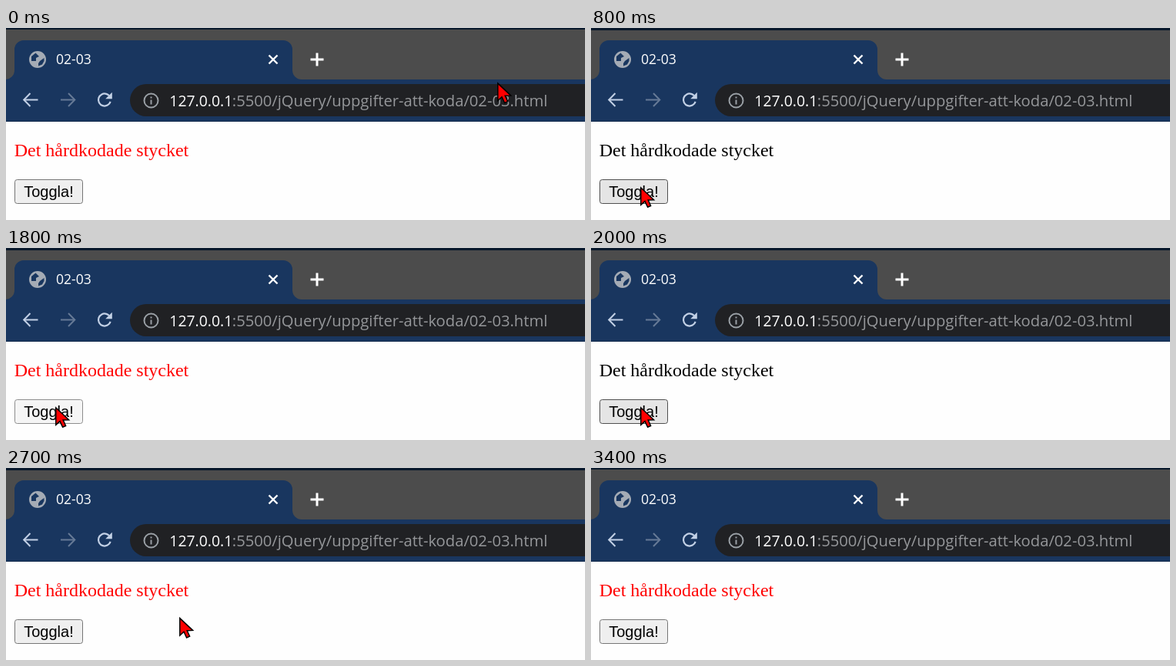
These frames come from a looping animation (752 by 250 pixels, 3500 ms). An HTML page with a canvas:

```html
<!DOCTYPE html>
<html lang="sv">
<head>
<meta charset="utf-8">
<title>02-03</title>
<style>
html, body { margin: 0; width: 100%; height: 100%; overflow: hidden; background: #fefefe; }
canvas { display: block; width: 752px; height: 250px; }
</style>
</head>
<body>
<canvas id="stage"></canvas>
<script>
const W = 752, H = 250, LOOP = 3500, STEP = 100;
const canvas = document.getElementById('stage');
const ratio = window.devicePixelRatio || 1;
canvas.width = W * ratio;
canvas.height = H * ratio;
const ctx = canvas.getContext('2d');
ctx.scale(ratio, ratio);

const UI = '"Open Sans", "Noto Sans", sans-serif';
const SERIF = '"Liberation Serif", "Times New Roman", serif';
const SANS = '"Liberation Sans", Arial, sans-serif';
const BLUE = '#19365f', ICON = '#c3d1e6', GREY = '#9aa0a6', WHITE = '#ffffff';

// The pointer advances one stop per step, in to the button and out again.
const REST = [64, 206.3];
const wayIn = [[638, 70.5], [677, 88], [368, 123], [129, 186.3], REST];
const wayOut = [REST, [225, 194], [553, 123], [651, 69], [709, 54]];
const LEAVE = 2600;
const clicks = [[600, 800], [1200, 1300], [1800, 1900], [2400, 2500]];

function pointerAt(t) {
  const i = Math.floor(t / STEP);
  return t < LEAVE ? wayIn[Math.min(i, wayIn.length - 1)] : wayOut[i - LEAVE / STEP];
}

function buttonLook(t) {
  if (clicks.some(([down, up]) => t >= down && t < up)) return ['#f5f5f5', '#8d8d8d'];
  return pointerAt(t) === REST ? ['#e5e5e5', '#4f4f4f'] : ['#efefef', '#767676'];
}

function textColor(t) {
  const toggles = clicks.filter(([, up]) => t >= up).length;
  return toggles % 2 ? '#000000' : '#ff0000';
}

function rect(x, y, w, h, color) {
  ctx.fillStyle = color;
  ctx.fillRect(x, y, w, h);
}

function text(str, x, y, size, family, color) {
  ctx.font = size + 'px ' + family;
  ctx.fillStyle = color;
  ctx.fillText(str, x, y);
}

function line(points, color, width) {
  ctx.beginPath();
  points.forEach(([x, y]) => ctx.lineTo(x, y));
  ctx.strokeStyle = color;
  ctx.lineWidth = width;
  ctx.stroke();
}

function polygon(points, color) {
  ctx.beginPath();
  points.forEach(([x, y]) => ctx.lineTo(x, y));
  ctx.closePath();
  ctx.fillStyle = color;
  ctx.fill();
}

function arc(x, y, r, from, to, color, width) {
  ctx.beginPath();
  ctx.arc(x, y, r, from, to);
  ctx.strokeStyle = color;
  ctx.lineWidth = width;
  ctx.stroke();
}

function rounded(x, y, w, h, r, color) {
  ctx.beginPath();
  ctx.roundRect(x, y, w, h, r);
  ctx.fillStyle = color;
  ctx.fill();
}

function tab(left, right, top, bottom, r) {
  ctx.beginPath();
  ctx.moveTo(left - r, bottom);
  ctx.arcTo(left, bottom, left, top, r);
  ctx.arcTo(left, top, right, top, r);
  ctx.arcTo(right, top, right, bottom, r);
  ctx.arcTo(right, bottom, right + r, bottom, r);
  ctx.lineTo(right + r, bottom);
  ctx.fillStyle = BLUE;
  ctx.fill();
}

function globe(x, y) {
  ctx.save();
  ctx.translate(x, y);
  rounded(-11, -11, 22, 22, 11, '#a4abb5');
  polygon([[-2.5, -8.5], [-8, -4], [-8, 2], [-2, 2], [-2, -2], [2, -4]], BLUE);
  polygon([[8.5, -2], [3, 2], [1, 5], [1, 8.5], [6, 6.5], [8.5, 2]], BLUE);
  ctx.restore();
}

function arrow(x, y, dir, color) {
  line([[x - 9 * dir, y], [x + 9 * dir, y]], color, 2);
  line([[x + dir, y - 8.5], [x + 9.3 * dir, y], [x + dir, y + 8.5]], color, 2);
}

function reload(x, y) {
  arc(x, y, 8, 0.3, Math.PI * 2 - 0.75, ICON, 2.2);
  polygon([[x + 9.8, y - 9.8], [x + 9.8, y - 1.2], [x + 1.2, y - 1.2]], ICON);
}

function info(x, y) {
  arc(x, y, 9, 0, Math.PI * 2, GREY, 2);
  rect(x - 1, y - 5, 2, 2, GREY);
  rect(x - 1, y - 1, 2, 6, GREY);
}

function cross(x, y, r) {
  for (const s of [-1, 1]) line([[x - r, y - r * s], [x + r, y + r * s]], WHITE, 2.4);
}

function browser(t) {
  rect(0, 0, W, 122, '#4c4c4c');
  rect(0, 0, W, t >= 800 && t < 3400 ? 3 : 2, '#08182b');
  tab(11, 372, 16, 67, 12);
  rect(0, 67, W, 55, BLUE);
  rect(0, 121, W, 1, '#10284b');
  globe(41, 41);
  text('02-03', 65, 47, 17.6, UI, WHITE);
  cross(347, 41, 5.5);
  rect(395.5, 39.5, 17, 3, WHITE);
  rect(402.5, 32.5, 3, 17, WHITE);

  arrow(32.5, 93.5, -1, ICON);
  arrow(80, 93.5, 1, '#667a96');
  reload(128, 93.5);

  const hovered = t >= 2900 && t < 3000;
  rounded(161, 73, 640, 42, 21, hovered ? '#27282b' : '#202124');
  info(188.5, 94.5);
  text('127.0.0.1', 212.3, 102, 19.4, UI, WHITE);
  text(':5500/jQuery/uppgifter-att-koda/02-03.html', 293.8, 102, 20.2, UI, '#95979a');
}

function page(t) {
  text('Det hårdkodade stycket', 10.7, 167, 24, SERIF, textColor(t));
  const [fill, edge] = buttonLook(t);
  rounded(11.5, 197.5, 88, 31, 3, fill);
  ctx.strokeStyle = edge;
  ctx.lineWidth = 1;
  ctx.stroke();
  text('Toggla!', 23.2, 220, 20, SANS, '#000000');
}

function cursor(pos) {
  if (!pos) return;
  ctx.save();
  ctx.translate(pos[0], pos[1]);
  polygon([[0.8, 1.6], [0.8, 24], [6, 19.3], [9.6, 27], [13.6, 25.2],
           [10.2, 17.7], [17.6, 17.4]], '#ff0000');
  ctx.strokeStyle = '#000000';
  ctx.lineWidth = 1.5;
  ctx.stroke();
  ctx.restore();
}

function draw(now) {
  const t = now % LOOP;
  rect(0, 0, W, H, '#fefefe');
  browser(t);
  page(t);
  cursor(pointerAt(t));
}

const start = performance.now();
function loop() {
  draw(performance.now() - start);
  requestAnimationFrame(loop);
}
loop();
</script>
</body>
</html>
```
